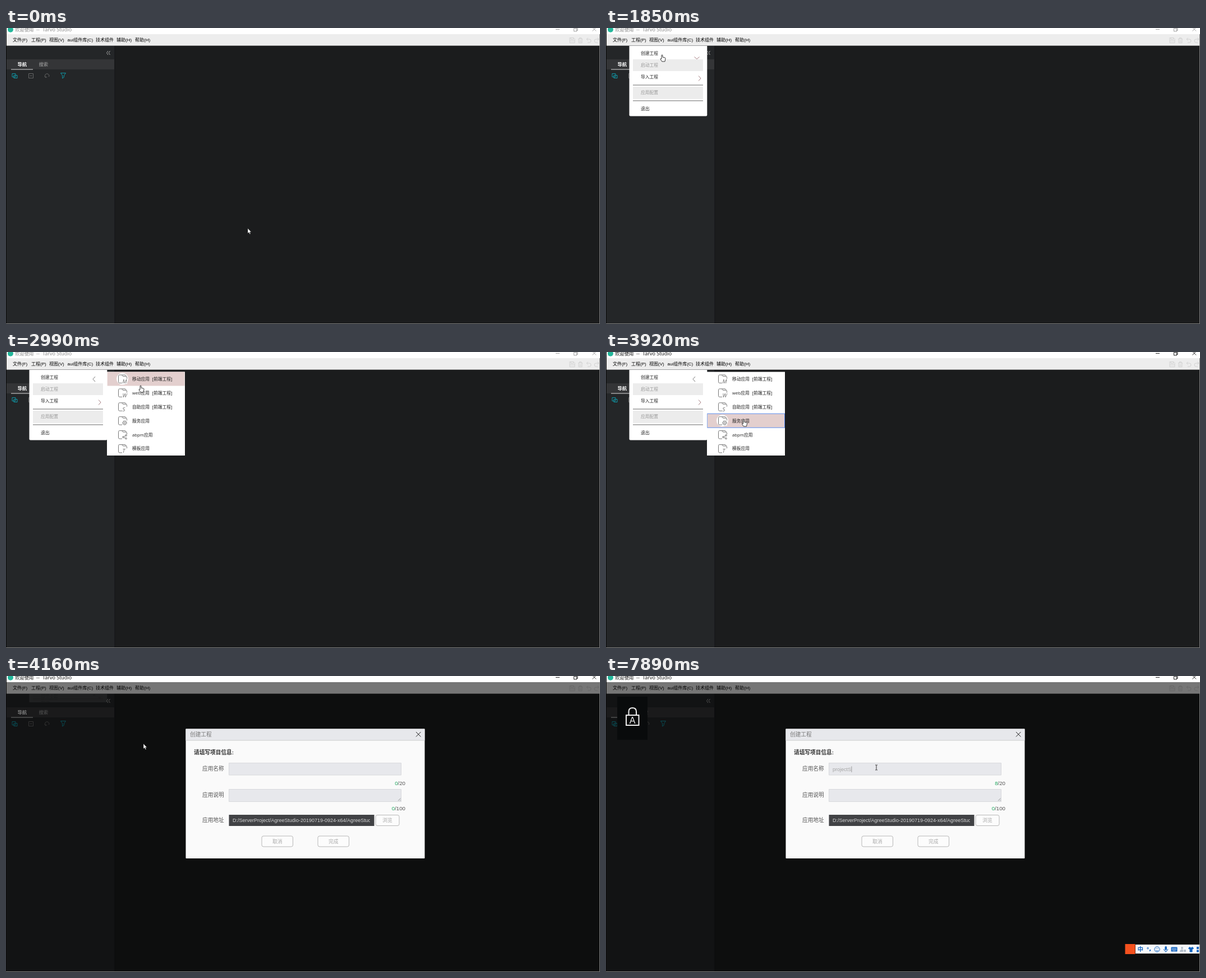
Write an HTML page that moves like this. It is 1059 px wide and 529 px high and loops after 8000 ms.

```html
<!DOCTYPE html>
<html lang="zh-CN">
<head>
<meta charset="utf-8">
<title>创建工程</title>
<style>
  html, body { margin: 0; width: 100%; height: 100%; overflow: hidden; background: #1b1c1d; }
  svg { display: block; }
  text { font-family: "Liberation Sans", "Noto Sans CJK SC", "Noto Sans CJK", sans-serif; font-size: 8px; white-space: pre; }
  .wide text, text.wide { font-family: "Open Sans", "Noto Sans", "Noto Sans CJK SC", "Noto Sans CJK", sans-serif; }
  .line { fill: none; stroke-width: 1; }
  .tab { font-size: 8.4px; }
  #caption text { font-size: 9px; }
  #caption .cjk { font-size: 8.4px; }
  #menu text, #submenu text { font-size: 7.75px; }
  #dialog text { font-size: 9.7px; fill: #555; }
  #dialog .field { font-size: 9px; }
  #dialog .button text { font-size: 8.8px; fill: #aaa; text-anchor: middle; }
  #dialog .count { text-anchor: end; }
  #dialog .count tspan { fill: #20a860; }
</style>
</head>
<body>
<svg id="stage" width="1059" height="529" viewBox="0 0 1059 529">
  <defs>
    <path id="arrow" d="M0 0V9L2.1 7.2 3.6 10.4 5 9.7 3.6 6.7H6.3Z" fill="#fff" stroke="#222" stroke-width=".5"/>
    <path id="hand" d="M-1 1.2Q0-.5 1 1.2V4.6L5 5.5Q6.2 5.9 6 7.3L5 12.4H-.2L-3 8.2Q-3.2 6.6-1 7.6Z" fill="#fff" stroke="#222" stroke-width=".9"/>
    <path id="ibeam" d="M-2-4.5H-.5L0-4 .5-4.5H2M0-4V4M-2 4.5H-.5L0 4 .5 4.5H2" fill="none" stroke="#222" stroke-width=".9"/>
    <path id="folder" class="line" stroke="#777" d="M6 7.5H-5Q-7 7.5-7 5.5V-5Q-7-7-5-7H-1L1-4.5H6Q8-4.5 8-2.5V0M-1-7H5L7-4.5"/>
  </defs>

  <rect width="1059" height="529" fill="#1b1c1d"/>
  <rect y="31" width="193.500" height="498" fill="#242628"/>
  <rect x="193.500" y="31" width="1.500" height="498" fill="#17181a"/>
  <rect y="56" width="193" height="18" fill="#343537"/>
  <rect y="11" width="1059" height="20.600" fill="#ededed"/>
  <g id="menubar" fill="#000"></g>
  <g class="line" stroke="#d2d2d2">
    <path d="M1005 17.500H1012L1014 19.500V26.500H1005ZM1007 17.500V20.500H1011.500V17.500M1005 23H1014"/>
    <path d="M1020 19.500H1028M1022.500 19V17.500H1025.500V19M1021 20V26.500H1027V20M1023 22V25M1025 22V25"/>
    <path d="M1037.500 17.500L1035 20 1037.500 22.500M1035 20H1040Q1043 20 1043 23T1040 26H1037"/>
    <path d="M1054.500 17.500L1057 20 1054.500 22.500M1057 20H1052Q1049 20 1049 23T1052 26H1055"/>
  </g>
  <path class="line" stroke="#aaa" d="M182 41L179.500 44.500 182 48M185.500 41L183 44.500 185.500 48"/>
  <text class="tab" x="20.500" y="67.700" fill="#fff" font-weight="bold">导航</text>
  <text class="tab" x="58.500" y="67.700" fill="#aaa">搜索</text>
  <rect x="9" y="73.500" width="39" height="1" fill="#ddd"/>
  <g class="line" stroke="#0f97a6">
    <path d="M11 81.500H17V87.500H11ZM14 84.500H20V89.500H14Z"/>
    <path d="M97.500 80.500H106.500L103.300 85V88L100.700 90V85Z"/>
  </g>
  <g class="line" stroke="#666">
    <path d="M40.500 81.500H48.500V89.500H40.500ZM42.500 85.500H46.500"/>
    <path d="M70.500 88A3.700 3.700 0 1 1 76.500 87M69 86L70.500 88.500 73 87.500"/>
  </g>

  <g id="submenu" class="wide">
    <rect x="180" y="35.500" width="139" height="149.500" fill="#fff"/>
    <g id="highlight"><rect x="180.500" width="138" height="25" fill="#e3cfce"/><circle cx="207.500" cy="12.500" r="10.500" fill="#fff"/></g>
    <g id="rows"></g>
  </g>
  <g id="menu">
    <path d="M41.500 32H180.300V155.500Q180.300 157.500 178.300 157.500H43.500Q41.500 157.500 41.500 155.500Z" fill="#fff"/>
    <path d="M48 56H173V77H48ZM48 105H173V127H48Z" fill="#ececec"/>
    <path d="M48 102H173M48 130H173" stroke="#666" stroke-width="1.200"/>
    <g fill="#222">
      <text x="62" y="48">创建工程</text><text x="62" y="69" fill="#999">启动工程</text>
      <text x="62" y="90">导入工程</text><text x="62" y="118.300" fill="#999">应用配置</text>
      <text x="62" y="146.500">退出</text>
    </g>
    <path id="chevron" class="line" d="M165 44L169 48.500 165 53"/>
    <path class="line" stroke="#a57c80" d="M165 85.500L169 90 165 94.500"/>
  </g>

  <rect id="shade" y="11" width="1059" height="518"/>

  <g id="dialog">
    <rect x="320.500" y="94.500" width="426" height="231.500" rx="1" fill="#fafafa"/>
    <rect x="320.500" y="94.500" width="426" height="20.500" fill="#e7e8ec"/>
    <path d="M320.500 115H746.500" stroke="#ccc"/>
    <text x="328" y="107.800" style="fill:#777">创建工程</text>
    <path class="line" stroke="#222" d="M731 100L739.500 108.500M739.500 100L731 108.500"/>
    <text x="335" y="139.700" font-weight="bold" style="fill:#333">请填写项目信息:</text>
    <text x="350" y="169.200">应用名称</text>
    <text x="350" y="215.500">应用说明</text>
    <text x="350" y="260.900">应用地址</text>
    <path d="M397.500 155.500H704.500V177H397.500ZM397.500 202.500H704.500V224.500H397.500Z" fill="#e7e8ec" stroke="#d8d9dc"/>
    <path d="M699 223L703.500 218.500M702 223L703.500 221.500" stroke="#888" stroke-width=".8"/>
    <text class="field" id="typed" x="404" y="169.800" style="fill:#a4a4a4"></text>
    <rect id="caret" y="161.500" width="1" height="10.500" fill="#999"/>
    <text class="count" x="712" y="194.500"><tspan id="length">0</tspan>/20</text>
    <text class="count" x="712" y="240.300"><tspan>0</tspan>/100</text>
    <rect x="397.500" y="248" width="259" height="20" fill="#414245"/>
    <svg x="397" y="248" width="252" height="20"><text class="field" x="7" y="13.200" style="fill:#d5d5d5">D:/ServerProject/AgreeStudio-20190719-0924-x64/AgreeStudio</text></svg>
    <g id="buttons" class="button"></g>
  </g>

  <g id="ime">
    <rect x="944" y="480" width="115" height="16" fill="#f7f9fc"/>
    <rect x="925.500" y="479" width="18" height="18" fill="#f4511e"/>
    <text id="language" x="947.500" y="492" fill="#1565c0" font-weight="bold" style="font-size:10.500px"></text>
    <g fill="#1565c0">
      <circle id="dot" cx="966" cy="486.500" r="1.300"/><path d="M969 489H971.500Q971.500 491.500 969 492.500Z"/>
      <rect x="996.300" y="483" width="3.600" height="7" rx="1.800"/>
      <rect x="1007.500" y="484.500" width="11" height="8" rx="1"/>
      <path d="M1040.500 484L1038 486.500 1039.500 488.500 1040.500 488V493.500H1045.500V488L1046.500 488.500 1048 486.500 1045.500 484 1043 485.500Z"/>
      <path d="M1053 484H1057V488H1053ZM1053 489.500H1057V493.500H1053ZM1058 484H1059V488H1058ZM1058 489.500H1059V493.500H1058Z"/>
    </g>
    <g class="line" stroke="#1565c0">
      <circle cx="982.500" cy="488.500" r="4.700"/>
      <path d="M980 490Q982.500 493 985 490M981 486V487.500M984 486V487.500M994.500 488Q995 492 998.100 492T1001.700 488M998.100 492V494"/>
    </g>
    <path d="M1009 487H1017M1009 489H1017M1010.500 491H1015.500" stroke="#f7f9fc" stroke-dasharray="1.500 .6" stroke-width=".9"/>
    <g fill="#b5c0cc"><circle cx="1027" cy="486" r="2"/><path d="M1023 493Q1023 488.500 1027 488.500L1029 489V493ZM1030 489H1034V493H1030Z"/></g>
  </g>

  <g id="lock">
    <rect x="20" y="37" width="54" height="77" fill="#090b0c"/>
    <path class="line" stroke="#eee" style="stroke-width:2" d="M36 70H58.500V88H36ZM40.500 70V63.500Q40.500 57 47.200 57T54 63.500V70"/>
    <text x="47.200" y="84.500" fill="#eee" text-anchor="middle" style="font-size:16px">A</text>
  </g>

  <g id="caption">
    <rect width="1059" height="11" fill="#fff"/>
    <circle cx="8" cy="2.800" r="5" fill="#24b79b"/>
    <g id="captionInk">
      <text class="cjk" x="16" y="6">欢迎使用</text>
      <text class="wide" x="54" y="6">--</text><text class="wide" x="65" y="6">Tarvo Studio</text>
    </g>
    <path id="windowInk" class="line" style="stroke-width:.9" d="M980 2.500H987M1012.500 .5H1017.500V6H1012.500ZM1014-1H1019V4.500H1017.500M1045.500-1L1052 5.500M1052-1L1045.500 5.500"/>
  </g>
  <path d="M.5 0V529" stroke="#0a0a0a"/>
  <path class="line" d="M0 528.500H1058.500V11" stroke="#808080"/>
  <use id="cursor"/>
</svg>
<script>
const $ = id => document.getElementById(id);
const LOOP = 8000, ROW_TOP = 35.5, ROW = 24.9;

$('menubar').innerHTML = [[12, '文件(F)'], [45, '工程(P)'], [77, '视图(V)'], [109.5, 'aui组件库(C)'],
  [160, '技术组件'], [197, '辅助(H)'], [230, '帮助(H)']]
  .map(([x, label]) => `<text x="${x}" y="24.300">${label}</text>`).join('');

const gear = '<circle cx="4" cy="4" r="2.800" class="line" stroke="#777"/><circle cx="4" cy="4" r="3.900" class="line" stroke="#777" stroke-dasharray="1.500 1.560"/><circle cx="4" cy="4" r="1" fill="#777"/>';
const nodes = '<path class="line" stroke="#777" d="M6.500 1.500L1.500 4.500 6.500 7"/><g fill="#fff" stroke="#777"><circle cx="6.500" cy="1.500" r="1.300"/><circle cx="1.500" cy="4.500" r="1.300"/><circle cx="6.500" cy="7" r="1.300"/></g>';
const letter = c => `<text x="0" y="7.800" fill="#666" font-style="italic" style="font-size:9.500px">${c}</text>`;
$('rows').innerHTML = [['移动应用', letter('M'), 1], ['web应用', letter('W'), 1], ['自助应用', letter('S'), 1],
  ['服务应用', gear], ['abpm应用', nodes], ['模板应用', letter('T')]]
  .map(([label, badge, front], i) => `<g transform="translate(207.500 ${ROW_TOP + ROW * (i + .5)})">
    <use href="#folder"/><rect x="-.5" y="0" width="9" height="9" fill="#fff"/>${badge}
    <text x="17.500" y="3" fill="#222">${label}</text>${front ? '<text x="53" y="3" fill="#222">[前端工程]</text>' : ''}</g>`).join('');

$('buttons').innerHTML = [[659, 248.5, 42, '浏览'], [456, 286, 55.5, '取消'], [556, 286, 55.5, '完成']]
  .map(([x, y, w, label]) => `<rect x="${x}" y="${y}" width="${w}" height="19" rx="3" fill="#fcfcfc" stroke="#b8b8b8"/>
    <text x="${x + w / 2}" y="${y + 12.8}">${label}</text>`).join('');

// Each row: start time, then the values held until the next row
const cursorSteps = [
  [0, 'arrow', 431, 358], [280, 'arrow', 430, 355], [420, 'arrow', 380, 300], [560, 'arrow', 290, 215],
  [700, 'arrow', 190, 120], [850, 'arrow', 100, 48], [990, 'hand', 59, 16],
  [1430, 'hand', 68, 35], [1570, 'hand', 80, 40], [1710, 'hand', 92, 45], [1850, 'hand', 100, 47.5],
  [2000, 'hand', 112, 46], [2150, 'hand', 142, 45], [2300, 'hand', 184, 44], [2450, 'hand', 222, 46],
  [2580, 'hand', 232, 49], [2710, 'hand', 238, 53], [2850, 'hand', 240, 57], [2990, 'hand', 240, 59.5],
  [3140, 'hand', 241, 72], [3270, 'hand', 242, 88], [3400, 'hand', 243, 104], [3530, 'hand', 244, 118],
  [3650, 'hand', 245.5, 120.5], [4040, 'arrow', 245, 121], [4310, 'arrow', 255, 124],
  [4450, 'arrow', 330, 138], [4580, 'arrow', 430, 155], [4720, 'ibeam', 482, 163.5]
];
const menuSteps = [[0, 0], [990, .3], [1130, .8], [1280, 1], [4040, .6], [4160, .12], [4310, 0]];
const submenuSteps = [[0, 0], [2000, .5], [2150, 1], [4040, 0]];
const chevronSteps = [[0, 0], [1710, 45], [1850, 90], [2000, 150], [2150, 180]];
const dialogSteps = [[0, 0], [4040, .4], [4160, 1]];
const caretSteps = [[0, 0], [4850, 1], [5420, 0], [5880, 1], [7600, 0], [7750, 1]];
const lockSteps = [[0, 0], [7460, .6], [7600, 1]];
const keyTimes = [5880, 6130, 6420, 6570, 6720, 6880, 7040, 7890];

const at = (steps, t) => steps.findLast(step => step[0] <= t).slice(1);
const show = (id, opacity) => {
  $(id).style.display = opacity ? '' : 'none';
  $(id).setAttribute('opacity', opacity);
};
const unfold = (id, top, amount) => {
  show(id, amount);
  $(id).setAttribute('transform', `translate(0 ${top * (1 - amount)}) scale(1 ${amount || 1})`);
};

function draw(t) {
  const [shape, x, y] = at(cursorSteps, t);
  $('cursor').setAttribute('href', '#' + shape);
  $('cursor').setAttribute('transform', `translate(${x} ${y})`);

  unfold('menu', 32, at(menuSteps, t)[0]);
  unfold('submenu', ROW_TOP, at(submenuSteps, t)[0]);
  const angle = at(chevronSteps, t)[0];
  $('chevron').setAttribute('transform', `rotate(${angle} 162 48.5)`);
  $('chevron').setAttribute('stroke', angle === 180 ? '#777' : '#a57c80');

  const active = t >= 3920;
  const row = Math.floor((y - ROW_TOP) / ROW);
  show('highlight', x > 180 ? 1 : 0);
  $('highlight').setAttribute('transform', `translate(0 ${ROW_TOP + row * ROW})`);
  $('highlight').firstChild.setAttribute('stroke', active ? '#5b8def' : 'none');
  $('captionInk').setAttribute('fill', active ? '#111' : '#888');
  $('windowInk').setAttribute('stroke', active ? '#111' : '#999');

  const opening = at(dialogSteps, t)[0];
  show('shade', opening * .5);
  show('dialog', opening);
  $('dialog').setAttribute('transform', `translate(0 ${(opening - 1) * 20})`);

  const count = keyTimes.filter(key => key <= t).length;
  $('typed').textContent = 'projectS'.slice(0, count);
  $('length').textContent = count;
  $('caret').setAttribute('x', 404.3 + (count ? $('typed').getComputedTextLength() : 0));
  show('caret', at(caretSteps, t)[0]);

  show('ime', t >= 4850 ? 1 : 0);
  const chinese = t >= 7600;
  $('language').textContent = chinese ? '中' : '英';
  $('dot').setAttribute('fill', chinese ? 'none' : '#1565c0');
  $('dot').setAttribute('stroke', chinese ? '#1565c0' : 'none');
  show('lock', at(lockSteps, t)[0]);
}

const start = performance.now();
function tick() {
  draw((performance.now() - start) % LOOP);
  requestAnimationFrame(tick);
}
tick();
</script>
</body>
</html>
```
